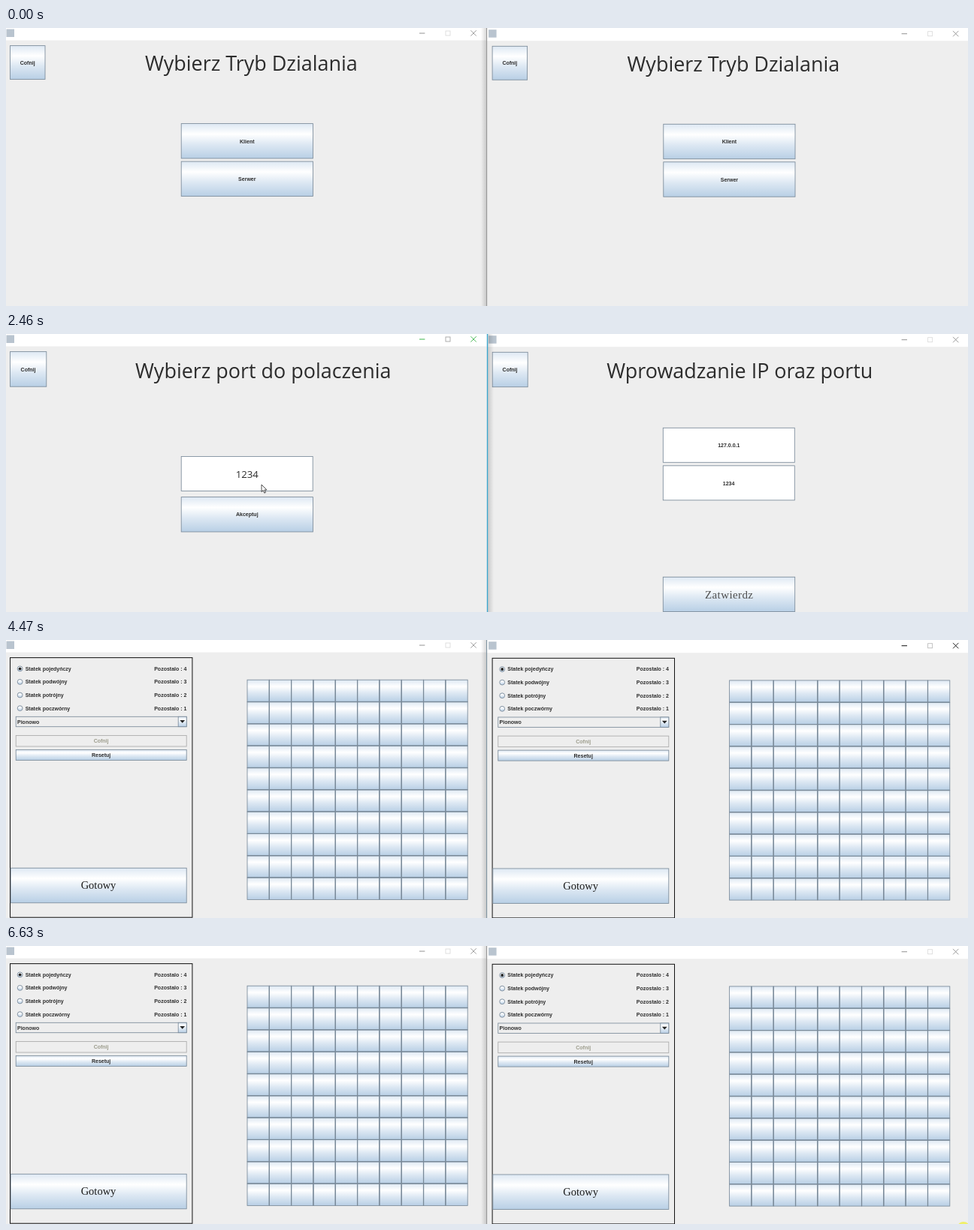
An HTML page that plays this animation: 1280x371 px, repeating every 6.8 s.

```html
<!DOCTYPE html>
<html lang="pl">
<head>
<meta charset="utf-8">
<style>
html, body { margin: 0; width: 100%; height: 100%; overflow: hidden; background: #eee; }
svg { display: block; }
text { font: bold 7px "Liberation Sans", Arial, sans-serif; fill: #2c2c2c; white-space: pre; }
text.title { font: 26.9px "Open Sans", "Noto Sans", sans-serif; }
text.port { font: 13.2px "Open Sans", "Noto Sans", sans-serif; }
text.ok { font: 15px "Liberation Serif", serif; letter-spacing: .4px; fill: #505050; }
text.ready { font: 14.5px "Liberation Serif", serif; fill: #1c1c1c; }
text.off { fill: #9c9c8c; }
</style>
</head>
<body>
<svg width="1280" height="371" viewBox="0 0 1280 371">
  <defs>
    <linearGradient id="steel" x1="0" y1="0" x2="0" y2="1">
      <stop offset="0" stop-color="#dde8f3"/>
      <stop offset=".3" stop-color="#fff"/>
      <stop offset=".6" stop-color="#dde8f3"/>
      <stop offset="1" stop-color="#b8cfe5"/>
    </linearGradient>
    <linearGradient id="shade">
      <stop offset="0" stop-color="#000" stop-opacity="0"/>
      <stop offset="1" stop-color="#000" stop-opacity=".16"/>
    </linearGradient>
  </defs>
  <g id="left"></g>
  <g id="right" transform="translate(641.6 .7)"></g>
  <g id="edge"></g>
  <circle id="spot" r="9" fill="#f0f032" opacity=".7"/>
  <path id="arrow" d="M0 0V9.6L2.2 7.6 3.8 11.2 5.4 10.5 3.9 7H6.9Z" fill="#fff" stroke="#222" stroke-width=".8"/>
</svg>
<script>
const LOOP = 6800, STEP = 77, LINE = '#7a8a99';
const el = id => document.getElementById(id);

// start, steps, end x, end y, optional bend x, y
const moves = [
  [130, 1, 688, 341],
  [210, 1, 672, 330],
  [380, 8, 903, 148],
  [1390, 7, 541, 206],
  [1920, 1, 479.7, 206],
  [2000, 5, 340, 201],
  [2770, 3, 331, 244],
  [3540, 9, 923, 337],
  [5470, 1, 943, 335],
  [5550, 8, 1270, 363, 1090, 272],
  [6170, 1, 1271, 367],
  [6250, 1, 1274, 377]
];
const clicks = [[1230, 1390], [2310, 2460], [3230, 3310], [4230, 4380], [6630, LOOP]];
const within = (t, a, b) => t >= a && t < b;

function pointer(t) {
  let x = 688, y = 341;
  for (const [start, n, ex, ey, bx = (x + ex) / 2, by = (y + ey) / 2] of moves) {
    if (t < start) break;
    const p = Math.min(1, (Math.floor((t - start) / STEP + .06) + 1) / n);
    const u = p * p * (3 - 2 * p), v = 1 - u;
    x = v * v * x + 2 * u * v * bx + u * u * ex;
    y = v * v * y + 2 * u * v * by + u * u * ey;
  }
  return { x, y, on: t >= 130 && !within(t, 4470, 4860) };
}

const rect = (x, y, w, h, fill, stroke = 'none', sw = .85) =>
  `<rect x="${x}" y="${y}" width="${w}" height="${h}" fill="${fill}" stroke="${stroke}" stroke-width="${sw}"/>`;
const path = (d, stroke, sw = 1) => `<path d="${d}" fill="none" stroke="${stroke}" stroke-width="${sw}"/>`;
const text = (x, y, s, cls = '', anchor = 'middle') =>
  `<text x="${x}" y="${y}" class="${cls}" text-anchor="${anchor}">${s}</text>`;

// pointer in the coordinates of the window being drawn
let mouse;
const over = (x, y, w, h) =>
  mouse.on && mouse.x > x && mouse.x < x + w && mouse.y > y && mouse.y < y + h;

function button(x, y, w, h, down = false) {
  if (down) return rect(x, y, w, h, '#b8cfe5', LINE) + path(`M${x} ${y + h}V${y}H${x + w}`, '#66727f', 1.3);
  return rect(x, y, w, h, 'url(#steel)', LINE) +
    (over(x, y, w, h) ? rect(x + 1.1, y + 1.1, w - 2.2, h - 2.2, 'none', '#b4cbe2', 1.2) : '');
}
const focus = (x, y, w, h) => rect(x, y, w, h, 'none', '#96aabd', .7);
const field = (x, y) => rect(x, y, 175, 46, '#fff', LINE);

function modeScreen(down) {
  return button(5.5, 23.6, 46.5, 44.9) + text(28.7, 48.8, 'Cofnij') +
    text(326.3, 57.4, 'Wybierz Tryb Dzialania', 'title') +
    button(233.2, 127.6, 175.2, 46.4, down === 'client') + text(320.8, 153.6, 'Klient') +
    button(233.2, 178.1, 175.2, 46.4, down === 'server') + text(320.8, 204.1, 'Serwer') +
    (down === 'client' ? focus(310.7, 147, 20.5, 9.5) : '') +
    (down === 'server' ? focus(308, 197.5, 26, 9.5) : '');
}

function clientScreen(down) {
  return button(5.6, 23.6, 47, 46.4) + text(28.9, 49.6, 'Cofnij') +
    text(334.6, 58.6, 'Wprowadzanie IP oraz portu', 'title') +
    field(232.7, 124.6) + text(320.2, 150.5, '127.0.0.1') +
    field(232.7, 175.1) + text(320, 201, '1234') +
    button(232.7, 323.6, 175.4, 46.2, down) + text(320.6, 352, 'Zatwierdz', 'ok') +
    (down ? focus(287.9, 337.7, 65, 18) : '');
}

function portScreen(down) {
  return button(5.5, 23.6, 48.3, 46.6) + text(29.5, 49.8, 'Cofnij') +
    text(342.2, 58.6, 'Wybierz port do polaczenia', 'title') +
    field(233.2, 163.5) + text(320.8, 192.3, '1234', 'port') +
    button(233.2, 217.6, 175.2, 46.4, down) + text(320.8, 243.4, 'Akceptuj') +
    (down ? focus(305.5, 236, 30.8, 9.7) : '');
}

function gameScreen() {
  let s = rect(5.5, 23.6, 242.4, 346.6, 'none', '#111', 1);
  ['pojedyńczy', 'podwójny', 'potrójny', 'poczwórny'].forEach((kind, i) => {
    const y = 38.3 + 17.6 * i;
    s += `<circle cx="18.6" cy="${y}" r="3.4" fill="url(#steel)" stroke="${LINE}" stroke-width=".9"/>`;
    if (!i) s += `<circle cx="18.6" cy="${y}" r="1.9" fill="#222"/>`;
    s += text(25.7, y + 2.5, 'Statek ' + kind, '', 'start') +
      text(240.4, y + 2.5, 'Pozostalo : ' + (4 - i), '', 'end');
  });
  s += rect(13.2, 102.3, 227, 13.4, '#eee', LINE) + text(15, 111.5, 'Pionowo', '', 'start') +
    rect(229.2, 102.3, 11, 13.4, 'url(#steel)', LINE) +
    '<path d="M231.3 107h6.8l-3.4 3.8z" fill="#222"/>' +
    rect(13.2, 127.4, 227, 14.6, '#eee', '#a9a9a9') + text(126.6, 137.1, 'Cofnij', 'off') +
    button(13.2, 146.4, 227, 14) + text(126.6, 156, 'Resetuj') +
    button(6.2, 304.3, 234, 46.5) + text(123, 332.3, 'Gotowy', 'ready');
  const cell = 29.32;
  for (let i = 0; i < 100; i++)
    s += button(321 + i % 10 * cell, 53.2 + Math.floor(i / 10) * cell, cell, cell);
  return s + path('M' + Array.from({ length: 9 }, (_, i) =>
    `${321 + (i + 1) * cell} 53.2v293.2M321 ${53.2 + (i + 1) * cell}h293.2`).join('M'), LINE, 1.3);
}

function frameOf(ink, boxInk) {
  return rect(-2, -1, 642, 372, '#eee') + rect(-2, -1, 642, 17.4, '#fff') +
    rect(.5, 1.5, 10.5, 10.5, '#b9c4cf') +
    path('M550 7h7.4', ink) + rect(585, 4, 6, 6, 'none', boxInk, .9) +
    path('M618.4 3.2l7.4 7.4m0-7.4l-7.4 7.4', ink, .9);
}

function draw(t) {
  const p = pointer(t);
  const leftOn = within(t, 2310, 4230);
  const rightOn = within(t, 1230, 2310) || within(t, 4230, 6630);

  mouse = p.x < 640 ? p : { on: false };
  el('left').innerHTML = frameOf(leftOn ? '#3db54a' : '#929292', leftOn ? '#a4a4a4' : '#dcdcdc') +
    (t < 2460 ? modeScreen(t >= 2310 && 'server') : t < 4470 ? portScreen(t >= 3230) : gameScreen());

  mouse = { x: p.x - 641.6, y: p.y - .7, on: p.on && p.x > 640 };
  el('right').innerHTML = frameOf(rightOn ? '#111' : '#929292', rightOn ? '#bcbcbc' : '#dcdcdc') +
    (t < 1390 ? modeScreen(t >= 1230 && 'client') : t < 4470 ? clientScreen(t >= 4230) : gameScreen());

  el('edge').innerHTML = leftOn
    ? `<g transform="matrix(-1 0 0 1 1281 0)">${rect(632, 0, 8, 371, 'url(#shade)')}</g>` +
      path('M640.5 0V371', '#36a6cf', 1.3)
    : rect(632, 0, 7.5, 371, 'url(#shade)') + path('M639.6 0V371', rightOn ? '#7d929f' : '#969696', 1.1);

  const at = `translate(${p.x.toFixed(1)} ${p.y.toFixed(1)})`;
  el('arrow').setAttribute('transform', at);
  el('spot').setAttribute('transform', at);
  el('arrow').style.display = p.on ? '' : 'none';
  el('spot').style.display = clicks.some(([a, b]) => within(t, a, b)) ? '' : 'none';
}

function tick() {
  draw(performance.now() % LOOP);
  requestAnimationFrame(tick);
}
tick();
</script>
</body>
</html>
```
